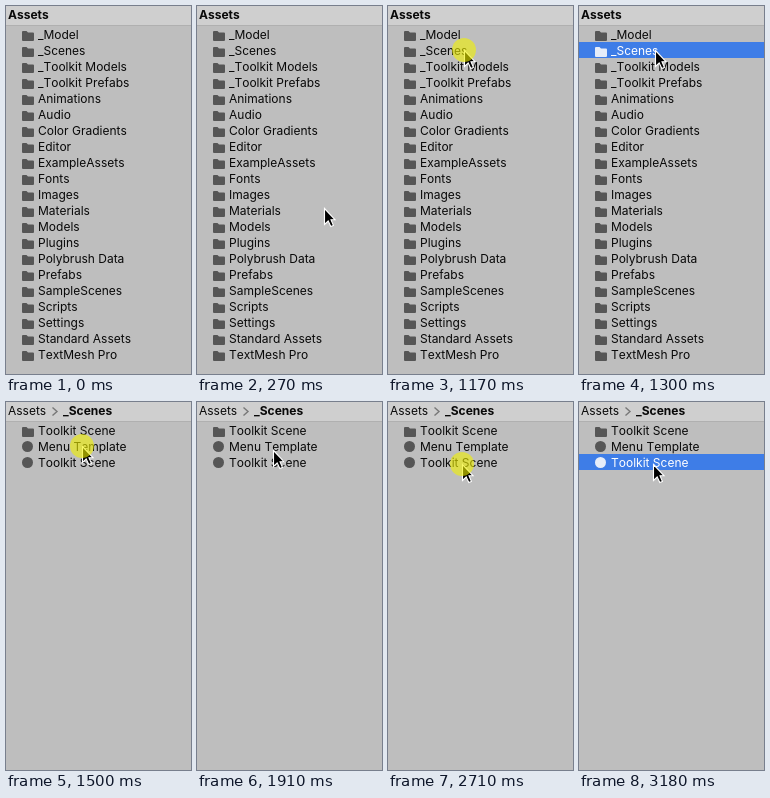
An HTML page that plays this animation: 185x368 px, repeating every 3510 ms.

```html
<!DOCTYPE html>
<html lang="en">
<head>
<meta charset="utf-8">
<title>Asset browser</title>
<style>
  html, body { margin: 0; width: 100%; height: 100%; overflow: hidden; background: #bebebe; }
  svg { display: block; width: 100%; height: 100%; }
  text { font: 12px Inter, Roboto, sans-serif; font-kerning: none; fill: #090909; }
  .bold { font-weight: 700; }
  .icon { fill: #565656; }
  .bar { fill: #3e7de7; visibility: hidden; }
  .selected .bar { visibility: visible; }
  .selected text { fill: #fff; }
  .selected .icon { fill: #e6edf9; }
</style>
</head>
<body>
<svg viewBox="0 0 185 368" preserveAspectRatio="none">
  <rect width="185" height="368" fill="#bebebe"/>
  <rect width="185" height="19" fill="#cfcfcf"/>
  <rect y="19" width="185" height="1" fill="#b0b0b0"/>
  <g id="root"><text class="bold" x="2" y="13">Assets</text></g>
  <g id="scenes">
    <text x="2" y="13">Assets</text>
    <path d="M46.5 5.5L51 9.5L46.5 13.5" fill="none" stroke="#777" stroke-width="1.4"/>
    <text class="bold" x="57" y="13">_Scenes</text>
  </g>
  <path id="cursor" d="M.5 .5V16.5L4.2 13L6.8 18.5L9.4 17.4L7 11.7H11Z" fill="#000" stroke="#fff" stroke-width="1.1"/>
  <circle id="click" r="12" fill="#f2f200" fill-opacity=".6"/>
</svg>
<script>
const LOOP = 3510;
const $ = id => document.getElementById(id);

const folder = '<path class="icon" d="M16 26Q16 25 17 25H20.5L22 26.5H27Q28 26.5 28 27.5V34Q28 35 27 35H17Q16 35 16 34Z"/>';
const scene = '<circle class="icon" cx="21.5" cy="28.5" r="5.5"/>';

function addRow(parent, label, icon, index) {
  const row = document.createElementNS('http://www.w3.org/2000/svg', 'g');
  row.setAttribute('transform', `translate(0 ${index * 16})`);
  row.innerHTML = `<rect class="bar" y="20" width="185" height="16"/>${icon}<text x="32" y="33">${label}</text>`;
  parent.append(row);
  return row;
}

const rootRows = ['_Model', '_Scenes', '_Toolkit Models', '_Toolkit Prefabs', 'Animations', 'Audio',
  'Color Gradients', 'Editor', 'ExampleAssets', 'Fonts', 'Images', 'Materials', 'Models', 'Plugins',
  'Polybrush Data', 'Prefabs', 'SampleScenes', 'Scripts', 'Settings', 'Standard Assets', 'TextMesh Pro']
  .map((label, i) => addRow($('root'), label, folder, i));
const sceneRows = [['Toolkit Scene', folder], ['Menu Template', scene], ['Toolkit Scene', scene]]
  .map(([label, icon], i) => addRow($('scenes'), label, icon, i));

const easeOut = p => 1 - (1 - p) ** 2;
const smooth = p => p * p * (3 - 2 * p);

// Pointer moves: start, end, number of steps, from, to, easing
const moves = [
  [70, 550, 7, [176, 333], [76, 65], easeOut],
  [550, 830, 4, [76, 65], [76, 44], smooth],
  [1772, 2250, 7, [76, 44], [74, 62], smooth]
];
const clicks = [[1170, 1300], [1500, 1570], [2710, 2980], [3050, 3180]];

function pointerAt(t) {
  const [start, end, steps, from, to, ease] = moves.findLast(m => t >= m[0]) || moves[0];
  const progress = Math.min(1, Math.max(0, (t - start) / (end - start)));
  const p = ease(Math.floor(progress * steps + 0.05) / steps);
  return from.map((v, i) => Math.round(v + (to[i] - v) * p));
}

const show = (el, on) => { el.style.display = on ? '' : 'none'; };

function render(t) {
  const inScenes = t >= 1500;
  show($('root'), !inScenes);
  show($('scenes'), inScenes);
  rootRows[1].classList.toggle('selected', t >= 1240);
  sceneRows[2].classList.toggle('selected', t >= 2780);
  const place = `translate(${pointerAt(t).join(' ')})`;
  for (const id of ['cursor', 'click']) $(id).setAttribute('transform', place);
  show($('cursor'), t >= 70);
  show($('click'), clicks.some(([on, off]) => t >= on && t < off));
}

const origin = performance.now();
function tick(now) {
  render(Math.max(0, now - origin) % LOOP);
  requestAnimationFrame(tick);
}
render(0);
requestAnimationFrame(tick);
</script>
</body>
</html>
```
